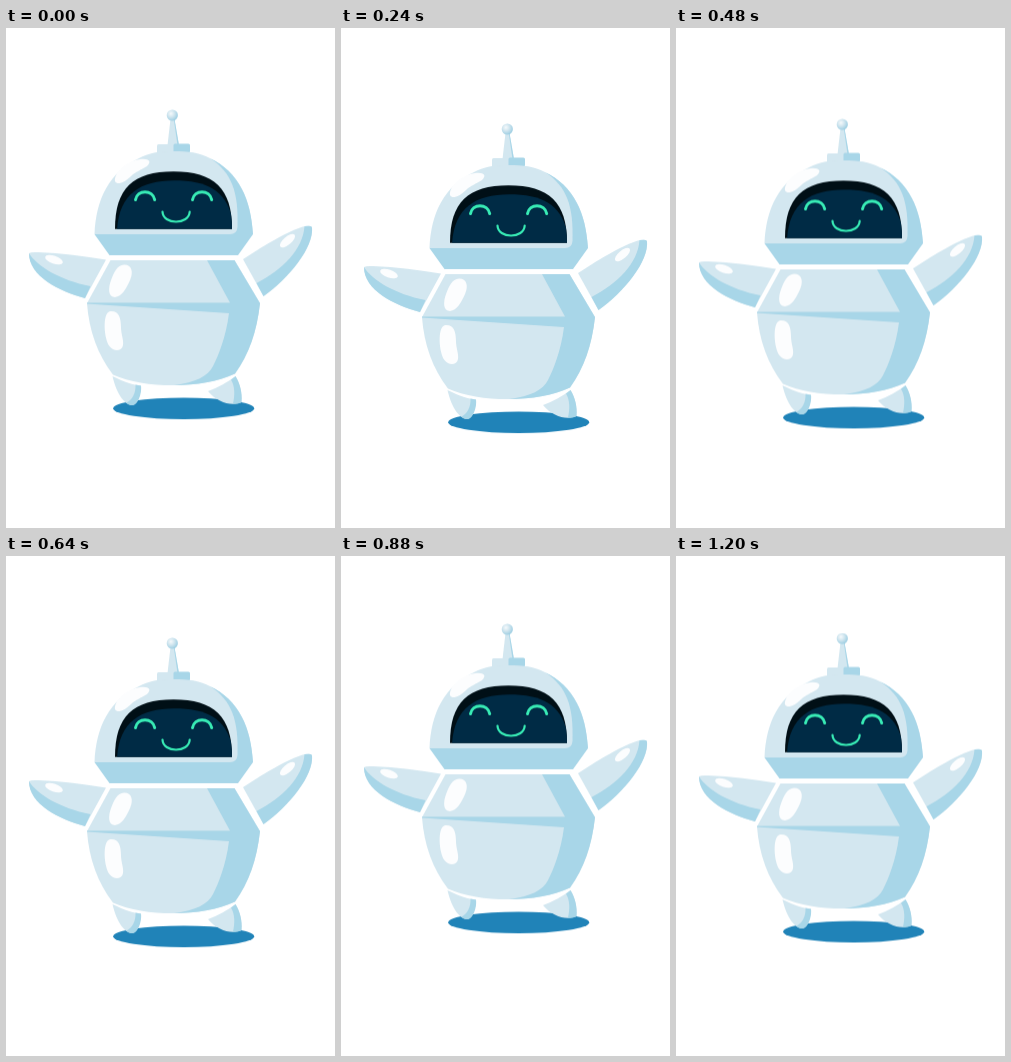
Recreate the animation shown at these times as an HTML page. Size 329x500 px, loop 1.28 s.

```html
<!DOCTYPE html>
<html lang="en">
<head>
<meta charset="utf-8">
<title>Floating robot</title>
<style>
  html, body { margin: 0; width: 100%; height: 100%; overflow: hidden; background: #fff; }
  svg { display: block; width: 100%; height: 100%; }
  .light { fill: #d3e7f0; }
  .shade { fill: #a8d6e8; }
  .shine { fill: #fcfdfe; }
  .face { fill: none; stroke: #38ebb5; stroke-linecap: round; }
</style>
</head>
<body>
<svg viewBox="0 0 329 500">
  <defs>
    <radialGradient id="bulb" cx=".38" cy=".35" r=".65">
      <stop offset="0" stop-color="#f6fafc"/>
      <stop offset=".45" stop-color="#d3e7f0"/>
      <stop offset="1" stop-color="#9fcfe3"/>
    </radialGradient>
    <clipPath id="visor">
      <path d="M109 186.700C109 146 127 129.200 167.500 129.200S226 146 226 186.700Z"/>
    </clipPath>
  </defs>

  <g id="robot">
    <ellipse cx="177.700" cy="366.200" rx="70.500" ry="10.800" fill="#2083b8"/>

    <!-- feet -->
    <path class="light" d="M106.500 334C119 340 127 342.500 135 343.500C135 351 132 363 126 363C117 362 110 349 106.500 334Z"/>
    <path class="shade" d="M129.500 342.500L135 343.500C136 351 132 363 126 363C123 363 121.500 362 120.500 360.500C126 358 130 351 129.500 342.500Z"/>
    <path class="light" d="M202 349C212 345.500 221 340 229.500 334C234 341 236.500 351 235.500 360C226 364 212 361 202 349Z"/>
    <path class="shade" d="M225 337.500L229.500 334C234 341 236.500 351 235.500 360C233 361.500 230 362 227 361.500C229 353 229 344 225 337.500Z"/>

    <!-- arms -->
    <path class="light" d="M23 211Q25 209.500 32 210C56 211 78 214 100 217.500L79 256C53 249 23 234 23 211Z"/>
    <path class="shade" d="M23 211C31 224 54 238 84.500 244L79 256C53 249 23 234 23 211Z"/>
    <ellipse class="shine" cx="48" cy="217.500" rx="9.300" ry="4" transform="rotate(19 48 217.500)"/>
    <path class="light" d="M237 217C260 202 283 188 299 184Q305 183 306 185C308 205 283 236 257.500 254Z"/>
    <path class="shade" d="M298.500 184Q305 183 306 185C308 205 283 236 257.500 254L250.500 241C277 227 297 207 298.500 184Z"/>
    <ellipse class="shine" cx="281.500" cy="198.500" rx="9.300" ry="4" transform="rotate(-40 281.500 198.500)"/>

    <!-- body -->
    <path class="light" d="M104.500 218H228.500L254 261C251 289 243 312 229 331.500C198 346 141 347.500 107 332.500C92 313 83 289 81 261Z"/>
    <path class="shade" d="M201 218H228.500L254 261C251 289 243 312 229 331.500C211 339.500 191 343 168 343C190 340 202 334 207 324S220 295 223 271L81 261.500V260.500H224Z"/>
    <path class="shine" d="M118 222.500C125 222 128 229 124 238C120 247 116 254 109 255C102 255 102 246 105 238C108 230 111 223 118 222.500Z"/>
    <path class="shine" d="M104 269C113 268 115 276 115 285C115 292 118 298 117 303C116 309 108 310 103.500 304C98 297 96 271 104 269Z"/>

    <!-- antenna -->
    <path class="light" d="M164.500 77H168.500L173 103H161.500Z"/>
    <path class="shade" d="M167.800 77H168.500L173 103H171.500Z"/>
    <circle cx="166.300" cy="73" r="5.600" fill="url(#bulb)"/>
    <rect class="light" x="151" y="102" width="18" height="10" rx="1.500"/>
    <rect class="shade" x="167.500" y="101.500" width="16.500" height="9" rx="1.500"/>

    <!-- head -->
    <path class="light" d="M88.500 192C90 157 103 130 133 116C144 110 154 109 168 109S193 110 204 116C233 130 245 157 247 192Z"/>
    <path class="shade" d="M204 116C233 130 245 157 247 192L232 213H103.500L88.500 192H224Q231 192 231.500 185C233 151 226 130 204 116Z"/>
    <path class="shine" d="M109 139C108 131 119 119 134 117C143 116 146 119 141 124C135 128 130 129 125 134C118 141 111 143 109 139Z"/>
    <g clip-path="url(#visor)">
      <rect x="108" y="128" width="119" height="60" fill="#000f16"/>
      <path fill="#002b45" d="M111 188C113 152 134 138.300 168 138.300C201 138.300 219 148 226 175V188Z"/>
    </g>
    <path class="face" stroke-width="3" d="M129.500 157.500C131 147 147 147 148.700 157.500M186.500 157.500C188 147 204 147 205.700 157.500"/>
    <path class="face" stroke-width="2.200" d="M156.500 169.500C157 182.800 183 182.800 183.700 169.500"/>
  </g>
</svg>
<script>
  const STEP = 80, BASE = 14.2;
  const rise = [0, 4.7, 9.2, 13.9, 16.3];
  const half = [...rise, ...rise.slice(1, 4).reverse()];
  const bob = [...half, ...half.map(y => -y), 0];

  document.getElementById("robot").animate(
    bob.map(y => ({ transform: `translateY(${y + BASE}px)`, easing: "step-end" })),
    { duration: STEP * (bob.length - 1), iterations: Infinity }
  );
</script>
</body>
</html>
```
